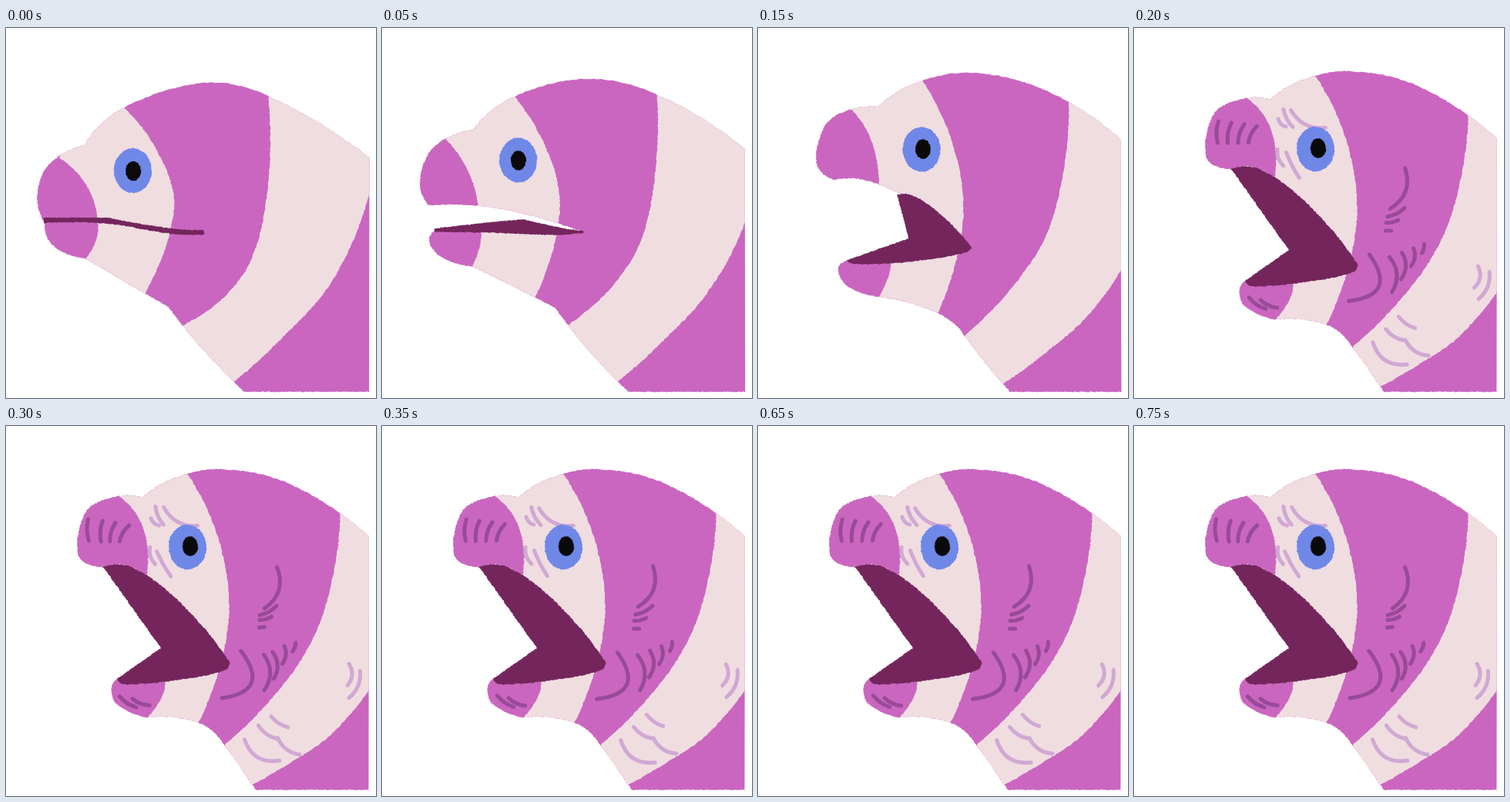
Write an HTML page with a canvas that moves like this. It is 480 by 480 pixels and loops after 800 ms.

```html
<!DOCTYPE html>
<html lang="en">
<head>
<meta charset="utf-8">
<title>Screaming eel</title>
<style>
html, body { margin: 0; width: 100%; height: 100%; overflow: hidden; background: #fff; }
canvas { display: block; width: 480px; height: 480px; }
</style>
</head>
<body>
<canvas id="stage" width="480" height="480"></canvas>
<script>
const ctx = document.getElementById('stage').getContext('2d');
const STEP = 50, STEPS = 16, SCREAM_STEP = 4;
const PALE = '#f0dde0', PINK = '#ca66c0', MAROON = '#74265c', BLUE = '#6f88e8', BLACK = '#0a0a0a';
const CREASE = '#984a98', LILAC = '#d0a8d4';

// Key points of smooth curves; "/" marks a corner. All poses share the same chain of curves.
const poses = [
  { // closed
    body: '48,249 41,212 57,176 102,152 / 102,152 153,103 260,71 340,88 471,168 / 471,472 309,472 /' +
      '309,472 250,411 211,362 / 211,362 103,299 / 103,299 60,281 50,250 /' +
      '50,250 132,250 257,265 / 257,265 132,250 48,249',
    mouth: '49,253 132,254 215,267 257,268 / 257,262 215,260 132,246 / 132,246 90,246 / 90,246 49,246',
    nose: '70,169 105,205 119,250 / 119,250 117,275 102,301',
    front: '152,102 200,167 218,235 178,348',
    rear: '340,84 337,228 306,322 227,387',
    back: '472,212 422,330 345,415 294,460',
    gaze: '164.5,185 165,185.5'
  },
  { // opening
    body: '72,211 58,180 78,133 134,112 / 134,112 191,75 270,60 373,84 471,146 / 471,472 331,472 /' +
      '331,472 285,425 240,366 / 240,366 219,355 131,319 / 131,319 88,308 71,285 87,275 /' +
      '87,275 190,275 265,264 / 265,264 205,233 150,214 72,211',
    mouth: '87,276 130,278 190,275 265,264 / 265,264 235,250 / 235,250 190,258 / 190,258 87,274',
    nose: '97,121 118,165 131,214 / 139,277 131,320',
    front: '190,73 233,165 243,250 216,357',
    rear: '373,82 365,205 340,283 250,387',
    back: '472,284 435,343 365,416 316,458',
    gaze: '189,158 189,158'
  },
  { // screaming
    body: '126,183 94,167 104,111 141,92 177,93 / 177,93 215,69 275,56 365,74 471,143 / 471,472 324,472 /' +
      '324,472 300,437 283,414 / 283,414 250,385 182,378 / 182,378 143,360 137,340 144,328 /' +
      '144,328 220,330 289,306 / 289,306 225,228 163,183 126,183',
    mouth: '144,328 152,335 220,330 284,317 290,306 / 290,306 225,228 163,183 126,183 /' +
      '126,183 201,288 / 201,288 144,328',
    nose: '145,90 177,130 183,194 / 206,328 203,350 181,381',
    front: '234,60 278,155 288,260 249,386',
    rear: '434,109 415,232 373,318 281,416',
    back: '472,341 420,402 375,433 319,466',
    gaze: '235.5,157 239,156'
  }
];

const mix = (a, b, k) => a + (b - a) * k;
const parse = text => text.trim().split(/\s+/).map(p => p.split(',').map(Number));

// Smooth curve through the points, sampled evenly along its length.
function sampleCurve(text, count = 120) {
  const pts = parse(text), last = pts.length - 1, at = [0];
  for (let i = 1; i <= last; i++) {
    at.push(at[i - 1] + Math.hypot(pts[i][0] - pts[i - 1][0], pts[i][1] - pts[i - 1][1]));
  }
  const chord = (a, b, axis) => (pts[b][axis] - pts[a][axis]) / (at[b] - at[a]);
  const slope = (i, axis) => {
    if (last === 1) return chord(0, 1, axis);
    if (i === 0) return 2 * chord(0, 1, axis) - slope(1, axis);
    if (i === last) return 2 * chord(last - 1, last, axis) - slope(last - 1, axis);
    return chord(i - 1, i + 1, axis);
  };
  const samples = [];
  for (let n = 0, i = 0; n < count; n++) {
    const d = at[last] * n / (count - 1);
    while (i < last - 1 && d > at[i + 1]) i++;
    const len = at[i + 1] - at[i], u = (d - at[i]) / len, v = 1 - u;
    samples.push([0, 1].map(axis =>
      pts[i][axis] * v * v * (1 + 2 * u) + pts[i + 1][axis] * u * u * (1 + 2 * v) +
      len * u * v * (slope(i, axis) * v - slope(i + 1, axis) * u)));
  }
  return samples;
}

const sampleChain = text => text.split('/').flatMap(part => sampleCurve(part));
const sampled = poses.map(pose => Object.fromEntries(Object.entries(pose).map(
  ([name, text]) => [name, name === 'gaze' ? parse(text) : sampleChain(text)])));

// The head moves evenly through the three poses, then holds the scream.
function poseAt(step) {
  const place = Math.min(step * 2 / SCREAM_STEP, 2), i = Math.min(Math.floor(place), 1);
  const pose = {};
  for (const name in sampled[i]) {
    pose[name] = sampled[i][name].map((p, n) =>
      p.map((v, axis) => mix(v, sampled[i + 1][name][n][axis], place - i)));
  }
  return pose;
}

let seed = 1;
function random() {
  seed = (seed * 16807) % 2147483647;
  return seed / 2147483647;
}
const jitter = size => (random() - 0.5) * size;

// Filled outline with a slightly ragged crayon edge.
function fill(points, color) {
  const path = new Path2D();
  for (const [x, y] of points) path.lineTo(x + jitter(1.2), y + jitter(1.2));
  path.closePath();
  ctx.fillStyle = color;
  ctx.fill(path);
  return path;
}

// Everything on the snout side of a stripe border.
function fillAhead(border, color) {
  const top = border[0][0], bottom = border[border.length - 1][0];
  fill([...border, [bottom, 480], [0, 480], [0, 0], [top, 0]], color);
}

function oval([x, y], rx, ry, color) {
  const points = Array.from({ length: 90 }, (_, i) => {
    const a = i / 90 * Math.PI * 2;
    return [x + rx * Math.cos(a), y + ry * Math.sin(a)];
  });
  fill(points, color);
}

// A row of bent strokes; each [first, last] pair is spread over the row.
function wrinkles(count, xs, ys, lengths, angles, bends, color, shake) {
  ctx.strokeStyle = color;
  ctx.lineWidth = 5;
  ctx.lineCap = 'round';
  for (let i = 0; i < count; i++) {
    const k = count > 1 ? i / (count - 1) : 0;
    const [x, y, length, angle, bend] = [xs, ys, lengths, angles, bends].map(([a, b = a]) => mix(a, b, k));
    const turn = (angle + jitter(shake * 3)) * Math.PI / 180;
    const cx = x + jitter(shake), cy = y + jitter(shake);
    const dx = Math.cos(turn), dy = Math.sin(turn), half = length / 2;
    ctx.beginPath();
    ctx.moveTo(cx - dx * half, cy - dy * half);
    ctx.quadraticCurveTo(cx - dy * bend * 2, cy + dx * bend * 2, cx + dx * half, cy + dy * half);
    ctx.stroke();
  }
}

function drawWrinkles(shake) {
  const dark = (...row) => wrinkles(...row, CREASE, shake);
  const light = (...row) => wrinkles(...row, LILAC, shake);
  dark(4, [109, 154], [135, 138], [28, 24], [92, 117], [2]);     // nose
  dark(2, [160, 175], [357, 358], [26, 24], [35, 25], [2]);      // chin
  dark(1, [342], [208], [56], [110], [-11]);                     // cheek
  dark(3, [340, 330], [239, 263], [25, 7], [153, 180], [-2, 0]);
  dark(1, [292], [324], [66], [114], [-28]);                     // jaw hinge
  dark(4, [333, 375], [320, 286], [46, 12], [86, 104], [-8, -1]);
  light(2, [192, 200], [123, 117], [14, 26], [45, 62], [2]);     // brow
  light(1, [226], [118], [50], [27], [8]);
  light(2, [190, 206], [168, 178], [23, 37], [70, 63], [3, 1]);  // under the eye
  light(2, [444, 454], [323, 334], [28, 38], [100, 112], [-5]);  // neck
  light(1, [354], [382], [26], [35], [2]);
  light(2, [339, 367], [398, 415], [29, 36], [31, 34], [3, 5]);
  light(1, [332], [422], [53], [33], [11]);
}

function draw(step) {
  seed = 77 + Math.min(step, SCREAM_STEP);
  const pose = poseAt(step);
  ctx.clearRect(0, 0, 480, 480);

  const body = fill(pose.body, PINK);
  ctx.save();
  ctx.clip(body);
  fillAhead(pose.back, PALE);
  fillAhead(pose.rear, PINK);
  fillAhead(pose.front, PALE);
  fillAhead(pose.nose, PINK);
  ctx.restore();
  fill(pose.mouth, MAROON);

  // Three wrinkle drawings take turns.
  if (step >= SCREAM_STEP) drawWrinkles((step - SCREAM_STEP) % 3 * 2);
  oval(pose.gaze[0], 24.5, 29, BLUE);
  oval(pose.gaze[1], 10, 12.7, BLACK);
}

let shown = -1;
function tick() {
  const step = Math.floor(performance.now() / STEP) % STEPS;
  if (step !== shown) draw(shown = step);
  requestAnimationFrame(tick);
}
tick();
</script>
</body>
</html>
```
